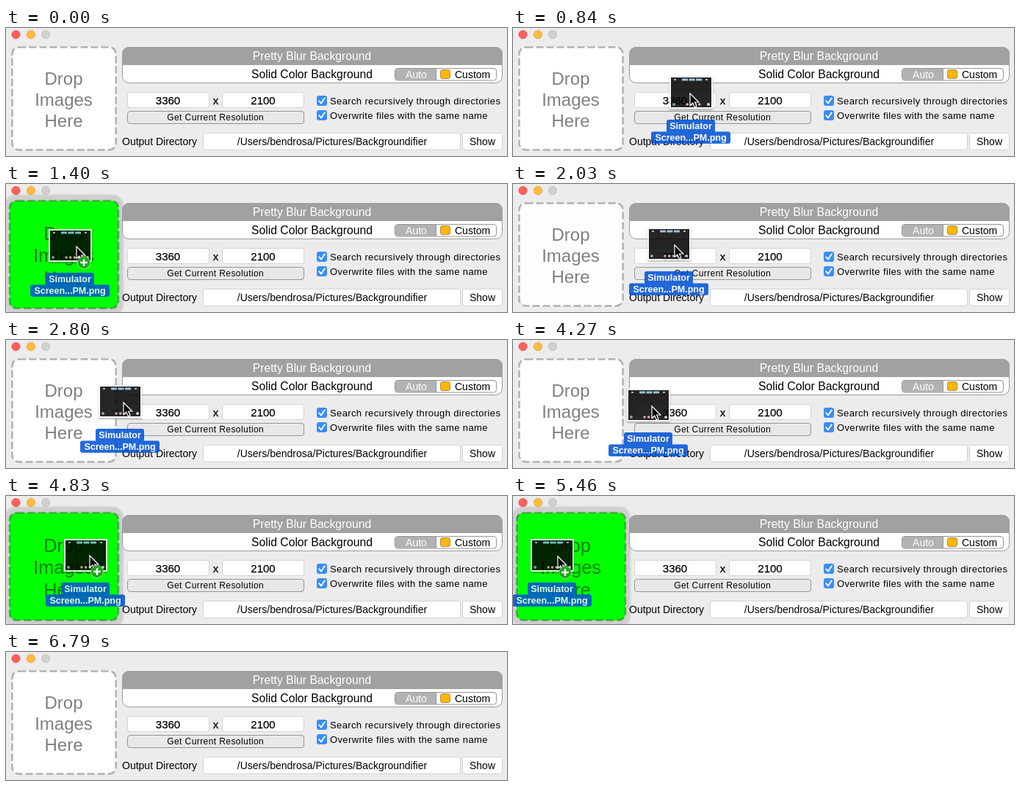
Animation, 682 px wide and 176 px high, one loop 6.86 s. Source, as an HTML page:

```html
<!DOCTYPE html>
<html lang="en">
<head>
<meta charset="utf-8">
<title>Drag and drop</title>
<style>
  html, body { margin: 0; width: 100%; height: 100%; overflow: hidden; background: #ececec; }
  svg { display: block; width: 682px; height: 176px; font: 14px "Liberation Sans", Arial, sans-serif; }
  .mid { text-anchor: middle; }
  .field { fill: #fff; stroke: #d2d2d2; }
  .big { font-size: 15.7px; }
  .num { font-size: 15px; stroke: #000; stroke-width: .25px; }
  .check { font-size: 13px; letter-spacing: .37px; }
  .prompt { font-size: 24px; fill: rgba(0, 0, 0, .5); }
  .name { font-size: 12.5px; font-weight: bold; fill: #fff; }
</style>
</head>
<body>
<svg viewBox="0 0 682 176">
  <defs>
    <filter id="soft" x="-20%" y="-20%" width="140%" height="140%"><feGaussianBlur stdDeviation="1"/></filter>
    <g id="box">
      <rect width="14" height="14" rx="3" fill="#3b8df7"/>
      <path d="M3.3 7.3 6 10.5 10.8 3.3" fill="none" stroke="#fff" stroke-width="1.9" stroke-linecap="round"/>
    </g>
  </defs>
  <rect width="682" height="176" fill="#ececec"/>
  <rect id="halo" x="-2" y="14.5" width="162" height="166" rx="15" fill="#cfcfcf" filter="url(#soft)"/>

  <g stroke-width=".7">
    <circle cx="13.5" cy="9" r="5.7" fill="#fc605c" stroke="#e04843"/>
    <circle cx="34" cy="9" r="5.7" fill="#fdbc40" stroke="#de9f34"/>
    <circle cx="54" cy="9" r="5.7" fill="#d0d0d0" stroke="#bcbcbc"/>
  </g>

  <g id="zone">
    <rect id="pad" x="8.5" y="26.5" width="141" height="141" rx="9" stroke="#000" stroke-opacity=".28" stroke-width="2.5" stroke-dasharray="10 4"/>
    <g class="mid prompt">
      <text x="78.5" y="78">Drop</text>
      <text x="78.5" y="107">Images</text>
      <text x="78.5" y="136">Here</text>
    </g>
  </g>

  <rect x="158.5" y="26.5" width="517" height="49" rx="9" fill="#fff" stroke="#999"/>
  <path d="M158 51V35.5a9.5 9.5 0 0 1 9.5-9.5H666.5a9.5 9.5 0 0 1 9.5 9.5V51Z" fill="#a1a1a1"/>
  <g class="mid big">
    <text x="416.5" y="43.5" fill="#fff">Pretty Blur Background</text>
    <text x="416.5" y="68.5">Solid Color Background</text>
  </g>
  <rect x="529.5" y="55.5" width="138" height="16.5" rx="3.5" fill="#fff" stroke="#949494"/>
  <path d="M585 56H533a3 3 0 0 0-3 3V69a3 3 0 0 0 3 3H585Z" fill="#b2b2b2"/>
  <path d="M585.5 56V72" stroke="#949494"/>
  <text class="mid" x="558.5" y="69" fill="#fff">Auto</text>
  <rect x="591.5" y="57.5" width="13" height="12" rx="2.5" fill="#fdb902" stroke="#a88a4a"/>
  <text x="611" y="69">Custom</text>

  <rect class="field" x="165.5" y="88.5" width="111" height="21" rx="3"/>
  <rect class="field" x="294.5" y="88.5" width="111" height="21" rx="3"/>
  <g class="mid num">
    <text x="220.5" y="105">3360</text>
    <text x="285.5" y="105">x</text>
    <text x="350" y="105">2100</text>
  </g>
  <rect x="165.5" y="114.5" width="240" height="17" rx="3.5" fill="#e8e8e8" stroke="#949494"/>
  <text class="mid" x="285.2" y="127" font-size="12" letter-spacing=".42">Get Current Resolution</text>

  <use href="#box" x="423" y="93"/>
  <use href="#box" x="423" y="113"/>
  <text class="check" x="441" y="105">Search recursively through directories</text>
  <text class="check" x="441" y="125">Overwrite files with the same name</text>

  <text x="158" y="161">Output Directory</text>
  <rect class="field" x="268.5" y="144.5" width="350" height="23" rx="3"/>
  <text class="mid" x="444" y="160.5">/Users/bendrosa/Pictures/Backgroundifier</text>
  <rect class="field" x="621.5" y="144.5" width="54" height="23" rx="3"/>
  <text class="mid" x="648.5" y="160.5">Show</text>

  <g id="icon" opacity=".86">
    <rect x="-29" y="1" width="59" height="46" fill="#000" opacity=".3" filter="url(#soft)"/>
    <rect x="-29" width="59" height="45" fill="#fff"/>
    <rect x="-27" y="2" width="55" height="41" fill="#030303"/>
    <path d="M-12 5H16" stroke="#8fb9d4" stroke-width="3" stroke-dasharray="8 1.5"/>
    <path d="M-23 5H-20M20 5H23" stroke="#aaa" stroke-width="2"/>
    <path d="M-5 39H15" stroke="#d9a5a8" stroke-width="3.5" stroke-linecap="round" stroke-dasharray=".1 5.5"/>
    <circle cx="-23" cy="39" r="2" fill="#7793ad"/>
    <circle cx="24" cy="39" r="2" fill="#ccc"/>
    <g fill="#0052d6">
      <rect x="-33" y="60" width="66" height="18" rx="3"/>
      <rect x="-54" y="76.5" width="108" height="16.5" rx="3"/>
    </g>
    <g class="mid name">
      <text y="73">Simulator</text>
      <text y="89">Screen...PM.png</text>
    </g>
  </g>
  <g id="cursor">
    <path d="M0 0V16.5L3.8 13 6.4 18.8 9 17.6 6.5 12H11.8Z" fill="#000" stroke="#fff" stroke-width="1.2"/>
    <g id="badge">
      <circle cx="10" cy="22" r="8.5" fill="#1fa51f" stroke="#fff" stroke-opacity=".5"/>
      <path d="M5.2 22H14.800M10 17.2V26.8" stroke="#fff" stroke-width="2.4"/>
    </g>
  </g>
</svg>
<script>
const LOOP = 6860, STEP = 70, DROP = 6370;
// time, icon centre x, icon top y
const path = [
  [0, 612, 178], [70, 581, 160], [420, 430, 88], [700, 308, 69], [840, 242, 66],
  [1050, 150, 64], [1330, 85, 62], [1610, 110, 61], [1820, 175, 60], [2030, 212, 60],
  [2170, 214, 60], [2450, 200, 61], [2800, 155, 62], [3080, 104, 63], [3220, 92, 64],
  [3430, 133, 64], [3570, 162, 65], [3780, 185, 66], [4060, 197, 67], [4200, 194, 67],
  [4270, 184, 67], [4550, 140, 63], [4900, 100, 58], [5180, 68, 57], [5460, 53, 59],
  [5700, 51, 60], [6500, 51, 60]
];
const hovers = [[1050, 1680], [2870, 3570], [4480, 6230]];
const $ = id => document.getElementById(id);
const clamp = v => Math.max(0, Math.min(1, v));

// Slope at a key, flat at turning points so the curve never overshoots.
function slope(i, k) {
  const a = path[i - 1], b = path[i], c = path[i + 1];
  if (!a || !c) return 0;
  const m = (b[k] - a[k]) / (b[0] - a[0]), n = (c[k] - b[k]) / (c[0] - b[0]);
  return m * n > 0 ? 2 * m * n / (m + n) : 0;
}

function place(t) {
  let i = 0;
  while (i < path.length - 2 && t >= path[i + 1][0]) i++;
  const a = path[i], b = path[i + 1], h = b[0] - a[0], u = clamp((t - a[0]) / h);
  return [1, 2].map(k => {
    const s = u * u * (3 - 2 * u);
    return a[k] + (b[k] - a[k]) * s
      + h * u * (1 - u) * ((1 - u) * slope(i, k) - u * slope(i + 1, k));
  });
}

function glow(t) {
  return Math.max(...hovers.map(([start, end]) => {
    if (t < start) return 0;
    return t < end ? clamp((t - start + STEP) / 210) : clamp(1 - (t - end) / 500) ** 4;
  }));
}

function move(id, x, y) {
  $(id).setAttribute("transform", `translate(${Math.round(x)} ${Math.round(y)})`);
}

function show(id, on) {
  $(id).style.display = on ? "" : "none";
}

function draw() {
  const t = Math.floor(performance.now() % LOOP / STEP) * STEP;
  const over = hovers.some(([start, end]) => t >= start && t < end);
  const dragging = t >= STEP && t < DROP;
  const g = glow(t), white = Math.round(255 * (1 - g));
  $("pad").setAttribute("fill", `rgb(${white},255,${white})`);
  $("zone").setAttribute("transform", `translate(79 97) scale(${1 + .05 * g}) translate(-79 -97)`);
  show("halo", over);
  show("badge", over);
  show("icon", dragging);
  show("cursor", dragging);
  move("icon", ...place(t));
  const [x, y] = place(t + 20); // the icon trails the pointer slightly
  move("cursor", x + 8, y + 24);
  requestAnimationFrame(draw);
}
draw();
</script>
</body>
</html>
```
